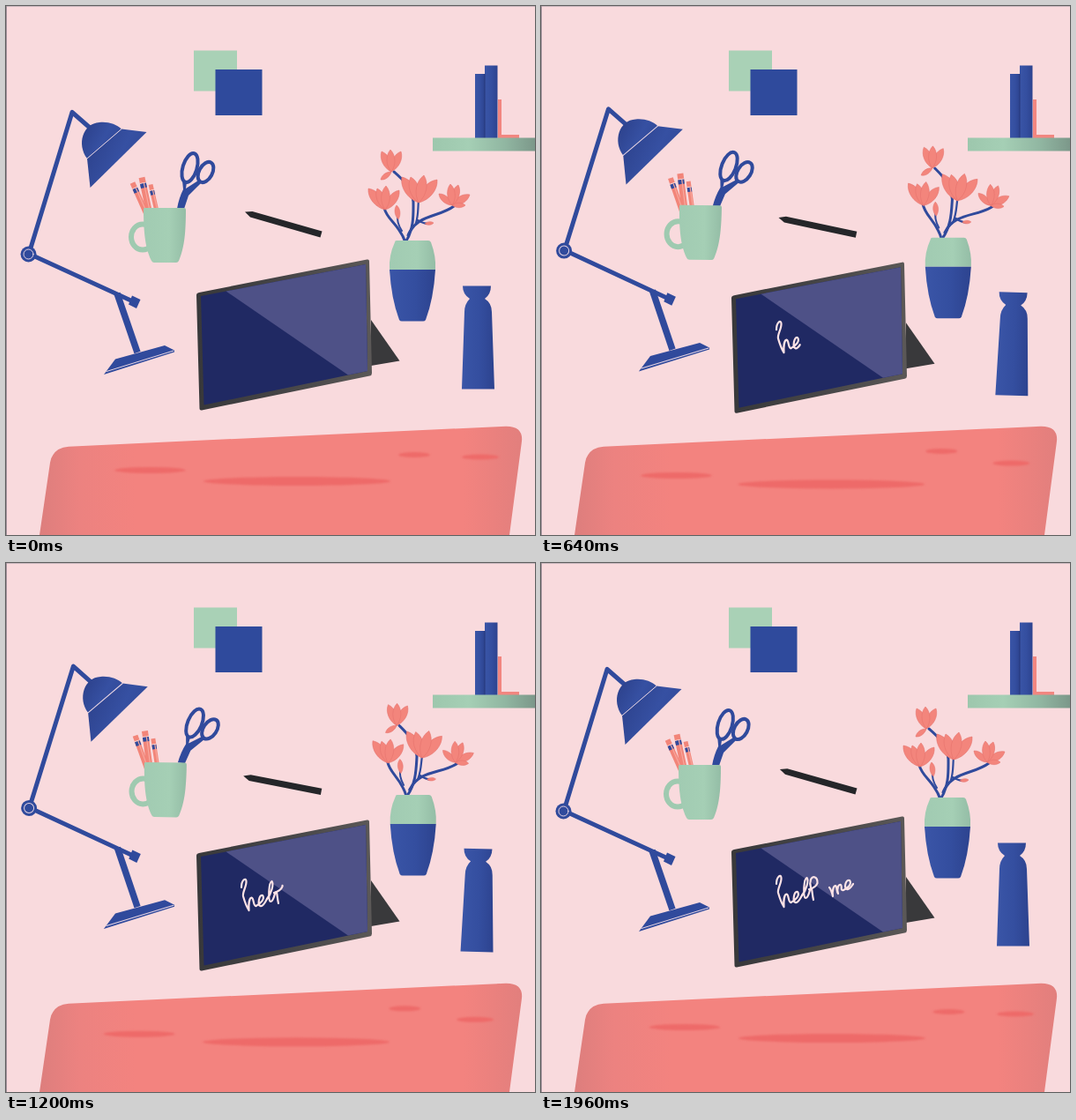
An HTML page that plays this animation: 600 by 600 pixels, repeating every 2 s.

```html
<!DOCTYPE html>
<html lang="en">
<head>
<meta charset="utf-8">
<title>Floating desk</title>
<style>
  html, body { margin: 0; width: 100%; height: 100%; overflow: hidden; background: #f9dadd; }
  svg { display: block; width: 100vw; height: 100vh; }
  .line { fill: none; stroke-linecap: round; stroke-linejoin: round; }
  .blue { stroke: #304a9c; }
  .thin { stroke: #e6d3e2; stroke-width: 1; }
</style>
</head>
<body>
<svg viewBox="0 0 600 600">
  <defs>
    <linearGradient id="navy">
      <stop offset="0" stop-color="#3a55a7"/><stop offset=".55" stop-color="#344e9f"/><stop offset="1" stop-color="#2d438f"/>
    </linearGradient>
    <linearGradient id="mint">
      <stop offset="0" stop-color="#a1cbb2"/><stop offset=".6" stop-color="#a5cfb5"/><stop offset="1" stop-color="#94bda6"/>
    </linearGradient>
    <linearGradient id="shelf">
      <stop offset="0" stop-color="#9dc7ad"/><stop offset=".35" stop-color="#a5cfb5"/><stop offset=".7" stop-color="#91b7a2"/><stop offset="1" stop-color="#7c988a"/>
    </linearGradient>
    <linearGradient id="shade" x1="0" y1=".3" x2="1" y2=".8">
      <stop offset="0" stop-color="#2d428d"/><stop offset=".5" stop-color="#3650a2"/><stop offset="1" stop-color="#304796"/>
    </linearGradient>
    <linearGradient id="bezel">
      <stop offset="0" stop-color="#38383a"/><stop offset=".5" stop-color="#464547"/><stop offset="1" stop-color="#5b5857"/>
    </linearGradient>
    <linearGradient id="sofa">
      <stop offset="0" stop-color="#dd7e7d"/><stop offset=".08" stop-color="#ec8280"/><stop offset=".2" stop-color="#f3837f"/>
      <stop offset=".88" stop-color="#f3837f"/><stop offset="1" stop-color="#e27f7d"/>
    </linearGradient>
    <filter id="soft" x="-10%" y="-50%" width="120%" height="200%"><feGaussianBlur stdDeviation="1"/></filter>
  </defs>

  <rect width="600" height="600" fill="#f9dadd"/>
  <path d="M213 50.5H262V96.5H213Z" fill="#a9d1b6"/>
  <path d="M237.5 72H290.5V124H237.5Z" fill="#2f4a9c"/>

  <path d="M558 106h4v40h20v4h-24z" fill="#f28680"/>
  <path d="M532 77h11v73h-11z" fill="url(#navy)"/>
  <path d="M543 67.5h14.5v82.5h-14.5z" fill="url(#navy)"/>
  <path d="M543 77v73" stroke="#26397b" stroke-width="1"/>
  <path d="M484 149.5h116v15h-116z" fill="url(#shelf)"/>

  <g id="lamp">
    <g class="line blue" stroke-width="5">
      <path d="M95 138L75 120.5L26 281L146 336"/>
      <path d="M126 326L149 393" stroke-width="7.5" stroke-linecap="butt"/>
    </g>
    <path d="M143 328.5l9.5 4.5l-4.5 10l-9 -4.5z" fill="#304a9c"/>
    <circle cx="25.5" cy="281.5" r="9" fill="#304a9c"/>
    <circle class="line thin" cx="25.5" cy="281.5" r="5.5"/>
    <path d="M92 173C80 157 87 133 106 132C116 131 125 134 131 139.5Z" fill="url(#shade)"/>
    <path d="M92 173L131 139.5L159.5 143L95.5 206Z" fill="url(#shade)"/>
    <path class="line thin" d="M92 173L131 139.5"/>
    <path d="M111 418L124 400.5L180 385L191 390.5V392.5Z" fill="#304a9c"/>
    <path class="line thin" d="M114 414.5L190 391"/>
  </g>

  <g id="scissors">
    <g class="line blue" stroke-width="4">
      <ellipse cx="208.5" cy="183.5" rx="8" ry="17" transform="rotate(17 208.5 183.5)"/>
      <ellipse cx="226.5" cy="188.5" rx="7.5" ry="12.5" transform="rotate(28 226.5 188.5)"/>
    </g>
    <path d="M200 198L205 200L204 207L218 198L221 201L207 215L202 230H194Q196 218 201 208Z" fill="#304a9c"/>
  </g>
  <g id="pencils"></g>
  <g id="mug">
    <ellipse class="line" cx="155" cy="262" rx="13" ry="14.5" stroke="#9fcab0" stroke-width="6"/>
    <path d="M156 230Q156 229 158 229H202Q204 229 204 231C204 258 202 275 196 289Q195 291 193 291H168Q166 291 165 289C158 275 156 258 156 230Z" fill="url(#mint)"/>
  </g>

  <g id="stylus">
    <path d="M271 233.5L279.5 233L358.5 255.5L356.5 262.5L277 239.5Z" fill="#252629"/>
  </g>

  <g id="plant">
    <g class="line blue" stroke-width="3">
      <path d="M453 268C446 247 432 243 429 229"/>
      <path d="M449 255C444 247 444 243 444 238" stroke-width="2"/>
      <path d="M453 268C463 253 462 236 462 222C460 205 448 195 440 188"/>
      <path d="M456 260C466 236 491 240 508 227"/>
      <path d="M465 246C468 236 467 230 468 220M467 243Q474 247 479 247" stroke-width="2.2"/>
    </g>
    <g id="flowers"></g>
  </g>
  <g id="vase">
    <path d="M441 268Q441 266 443 266H479Q481 266 482 268Q488 284 487 299H435Q434 283 441 268Z" fill="url(#mint)"/>
    <path d="M435 299H487Q485 332 476 356Q475 357.5 473 357.5H449Q447 357.5 446 356Q437 332 435 299Z" fill="url(#navy)"/>
  </g>

  <g id="bottle">
    <path d="M518 317.5H550Q550 327 543 332Q551 337 551 347L554 434.5H517L520 347Q520 338 526 332Q518 327 518 317.5Z" fill="url(#navy)"/>
  </g>

  <g id="tablet">
    <path d="M414 356L446.5 402.5L414 408Z" fill="#39393b"/>
    <path d="M219 325L409.5 287.5Q412 287 412 289.5L415 416.5Q415 419 412.5 419.5L222 458.5Q219.5 459 219.5 456.5L216 328Q216 325.5 219 325Z" fill="url(#bezel)"/>
    <path d="M221 329L408 293L410 414L224.5 452.5Z" fill="#202963"/>
    <path d="M249.5 323.5L408 293L410 414L388 418.5Z" fill="#4e5187"/>
    <g id="writing" class="line" stroke="#fde3e6" stroke-width="2.2"></g>
  </g>

  <path d="M38 600L50 518Q53 501 71 499.7L567 476.7Q588 476.500 584.700 496L571 600Z" fill="url(#sofa)"/>
  <g id="shadows" fill="#ee6a69" filter="url(#soft)"></g>
  <path d="M0 .5H600" stroke="#c9b6bd"/>
  <path d="M.5 0V600" stroke="#9b8c95"/>
</svg>
<script>
  const LOOP = 2000;
  const $ = id => document.getElementById(id);

  function add(parent, tag, attrs) {
    const node = document.createElementNS("http://www.w3.org/2000/svg", tag);
    for (const key in attrs) node.setAttribute(key, attrs[key]);
    return parent.appendChild(node);
  }

  // Pencils: top position and lean
  function pencil(x, y, lean, width) {
    const g = add($("pencils"), "g", { transform: `translate(${x} ${y}) rotate(${lean})` });
    const band = (top, height, fill) =>
      add(g, "rect", { x: -width / 2, y: top, width, height, fill });
    band(0, 42, "#f28579");
    band(6, 1.2, "#fbd5d2");
    band(7, 5, "#304a9c");
    add(g, "path", { d: "M1 7V42", stroke: "#f7a79d", "stroke-width": 1.2 });
  }
  pencil(154, 194.5, -12, 7);
  pencil(143.5, 200.5, -24, 6);
  pencil(164, 202.5, -13, 5);

  // A pointed petal from its base to its tip
  function petal(x, y, tipX, tipY, plump = .24, fill = "#f3857c") {
    const length = Math.hypot(tipX - x, tipY - y);
    const angle = Math.atan2(tipX - x, y - tipY) * 180 / Math.PI;
    const w = length * plump;
    add($("flowers"), "path", {
      d: `M0 0C${-w} ${-length * .3} ${-w} ${-length * .75} 0 ${-length}` +
         `C${w} ${-length * .75} ${w} ${-length * .3} 0 0Z`,
      fill, stroke: "#e4716c", "stroke-width": .5,
      transform: `translate(${x} ${y}) rotate(${angle})`
    });
  }
  function flower(x, y, ...tips) {
    for (const [tipX, tipY] of tips) petal(x, y, tipX, tipY);
  }
  flower(437, 188, [425, 197], [426, 165], [448, 165], [436, 163]);
  flower(468, 223, [449, 194], [489, 197], [459, 194], [474, 192]);
  flower(430, 231, [411, 207], [446, 209], [421, 207], [431, 204]);
  flower(506, 226, [491, 213], [526, 214], [521, 226], [513, 203], [504, 202]);
  petal(445, 242, 443, 226);
  petal(475, 247, 485, 246);

  // Handwriting: each stroke with its start and end time
  const strokes = [
    ["M267 364C267 356 272 352 272.5 357C273 363 268 369 269 374C271 381 273 386 275.5 390C275 383 276 376 278.5 375.5C281.5 376 280 385 283.5 385", 220, 500],
    ["M283.5 385C289 382 294 377 291 373C287 371 285 384 288.5 385C291 386 294 381 296 377", 500, 660],
    ["M296 377C301 371 304 360 301.5 357C298 358 297 379 300 380C302 380 304 375 305 371", 660, 900],
    ["M305 371C308 366 307 374 309 382", 900, 1060],
    ["M304 370C308 369 312 367 313.5 363C314 356 308 354 306 359C305 362 305 365 306 368", 1080, 1400],
    ["M327 368C329 370 330 374 331 378C330 371 332 366 334 366C336 367 335 373 337 375C335 368 338 364 340 365C342 367 339 372 343 371", 1440, 1760],
    ["M343 371C348 369 353 364 350 360C346 358 343 368 347 370C350 371 352 367 354 364", 1760, 1950]
  ].map(([d, start, end]) => {
    const node = add($("writing"), "path", { d });
    return { node, start, end, length: node.getTotalLength() };
  });

  const ellipses = [[330, 539, 106, 5], [163.5, 526.5, 40.5, 3.5], [463, 509, 18, 3], [538, 511.5, 21, 3]]
    .map(([cx, cy, rx, ry]) => ({ cx, cy, node: add($("shadows"), "ellipse", { cx, cy, rx, ry }) }));

  // Eased rise until peak, eased fall until end, then rest
  function sway(t, peak, end) {
    const p = t < peak ? t / peak : Math.max(0, (end - t) / (end - peak));
    return (1 - Math.cos(Math.PI * p)) / 2;
  }

  function pose(id, dx, dy, angle = 0, px = 0, py = 0) {
    $(id).setAttribute("transform", `translate(${dx} ${dy}) rotate(${angle} ${px} ${py})`);
  }
  function slide(i, dx, dy) {
    const { node, cx, cy } = ellipses[i];
    node.setAttribute("cx", cx + dx);
    node.setAttribute("cy", cy + dy);
  }

  function draw(t) {
    const quick = sway(t, 900, 1760);
    const slow = sway(t, 1000, LOOP);
    const steady = 1 - Math.abs(1 - t / 1000);

    pose("lamp", 0, -4 * quick, .38 * quick, 150, 400);
    pose("mug", .5 * quick, -3.8 * quick, .9 * quick, 178, 275);
    pose("pencils", quick, -4 * quick, 6 * quick, 170, 230);
    pose("scissors", .5 * steady, -4.2 * steady, 7.3 * steady, 197, 235);
    pose("stylus", 0, .5 * steady, -6.3 * steady, 357, 258);
    pose("plant", 2 * quick, -4 * quick, 4.7 * quick, 453, 265);
    pose("vase", quick, -4 * quick);
    pose("bottle", 0, 9 * quick, 2 * quick, 535, 376);
    pose("tablet", 0, 4.4 * slow);

    slide(0, -slow, 4.8 * slow);
    slide(1, -15.5 * steady, 8.5 * slow);
    slide(2, -13.5 * steady, -5 * quick);
    slide(3, -6.5 * slow, 8.7 * quick);

    for (const { node, start, end, length } of strokes) {
      const p = Math.min(1, Math.max(0, (t - start) / (end - start)));
      node.setAttribute("visibility", p ? "visible" : "hidden");
      node.setAttribute("stroke-dasharray", `${p * length} ${length + 5}`);
    }
  }

  const begin = performance.now();
  function frame() {
    draw((performance.now() - begin) % LOOP);
    requestAnimationFrame(frame);
  }
  draw(0);
  requestAnimationFrame(frame);
</script>
</body>
</html>
```
